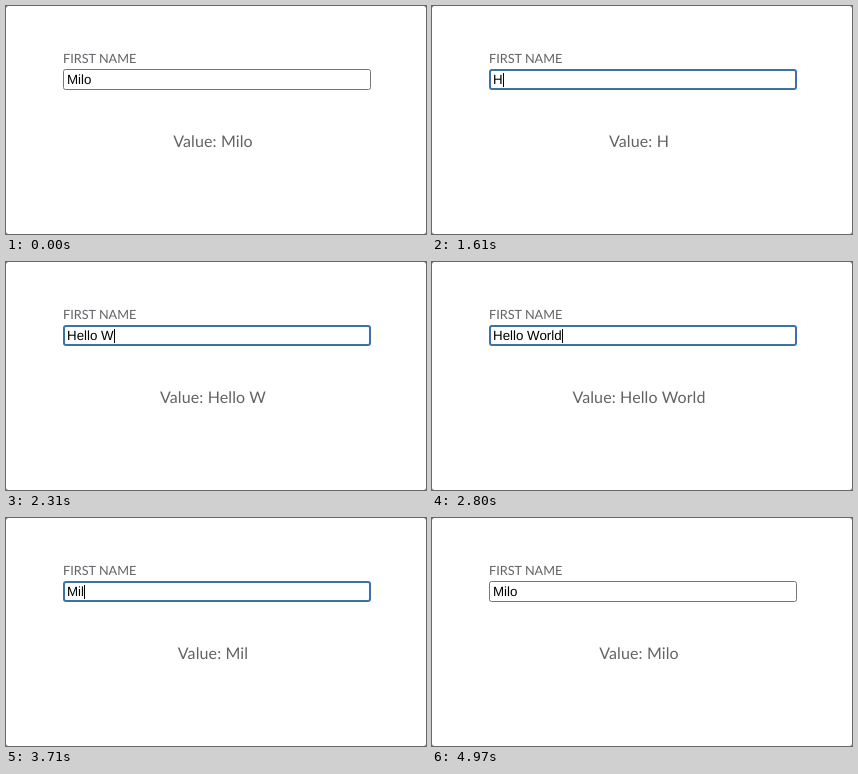
These frames come from a looping animation (420x228 px, 5950 ms). An HTML page:

```html
<!DOCTYPE html>
<html lang="en">
<head>
<meta charset="utf-8">
<title>Bound text field</title>
<style>
  html, body { margin: 0; width: 100%; height: 100%; overflow: hidden; background: #666; }
  svg { display: block; width: 420px; height: 228px; }
  text { white-space: pre; text-rendering: geometricPrecision; }
  .label, .value { font-family: Lato, sans-serif; fill: #626366; }
  .label { font-size: 12.7px; }
  .value { font-size: 16px; letter-spacing: .12px; text-anchor: middle; }
  #typed { font: 13.333px "Liberation Sans", Arial, sans-serif; }
</style>
</head>
<body>
<svg viewBox="0 0 420 228">
  <rect width="420" height="228" rx="2.5" fill="#fff"/>
  <text class="label" x="57" y="57">FIRST NAME</text>
  <rect id="field" fill="#fff"/>
  <rect id="selection" x="61" y="66" height="15" fill="#b3d7ff"/>
  <text id="typed" x="61" y="78"></text>
  <rect id="caret" y="67" width="1" height="14"/>
  <text id="value" class="value" x="207" y="141"></text>
</svg>
<script>
const LOOP = 5950, FOCUS = 770, BLUR = 4970;
const NAME = "Milo";

// [start in ms, field text, cursor: "caret", "select" or nothing]
const steps = [
  [0, NAME],
  [FOCUS, NAME, "caret"],
  [910, NAME, "select"],
  [1610, "H", "caret"],
  [1680, "He", "caret"],
  [1960, "Hel", "caret"],
  [2100, "Hello ", "caret"],
  [2310, "Hello W", "caret"],
  [2520, "Hello Wo", "caret"],
  [2660, "Hello Wor", "caret"],
  [2730, "Hello Worl", "caret"],
  [2800, "Hello World", "caret"],
  [3080, "Hello World", "select"],
  [3360, NAME.slice(0, 1), "caret"],
  [3500, NAME.slice(0, 2), "caret"],
  [3710, NAME.slice(0, 3), "caret"],
  [3850, NAME, "caret"],
  [4410, NAME]
];

const [field, selection, typed, caret, value] =
  ["field", "selection", "typed", "caret", "value"].map(id => document.getElementById(id));

function set(el, attrs) {
  for (const key in attrs) el.setAttribute(key, attrs[key]);
}

// The border grows inwards, so the outer edge stays in place.
function drawBorder(stroke, line) {
  set(field, {
    stroke, "stroke-width": line, rx: 2,
    x: 57 + line / 2, y: 63 + line / 2, width: 308 - line, height: 21 - line
  });
}

function draw() {
  const t = performance.now() % LOOP;
  const [, text, cursor] = steps.findLast(step => step[0] <= t);

  if (t >= FOCUS && t < BLUR) drawBorder("#3b72a8", 2);
  else drawBorder("#767676", 1);
  typed.textContent = text;
  value.textContent = "Value: " + text.trim();

  const width = typed.getComputedTextLength();
  set(selection, { width: cursor === "select" ? width : 0 });
  set(caret, { x: Math.round(61 + width), opacity: cursor === "caret" ? 1 : 0 });
  requestAnimationFrame(draw);
}
draw();
</script>
</body>
</html>
```
